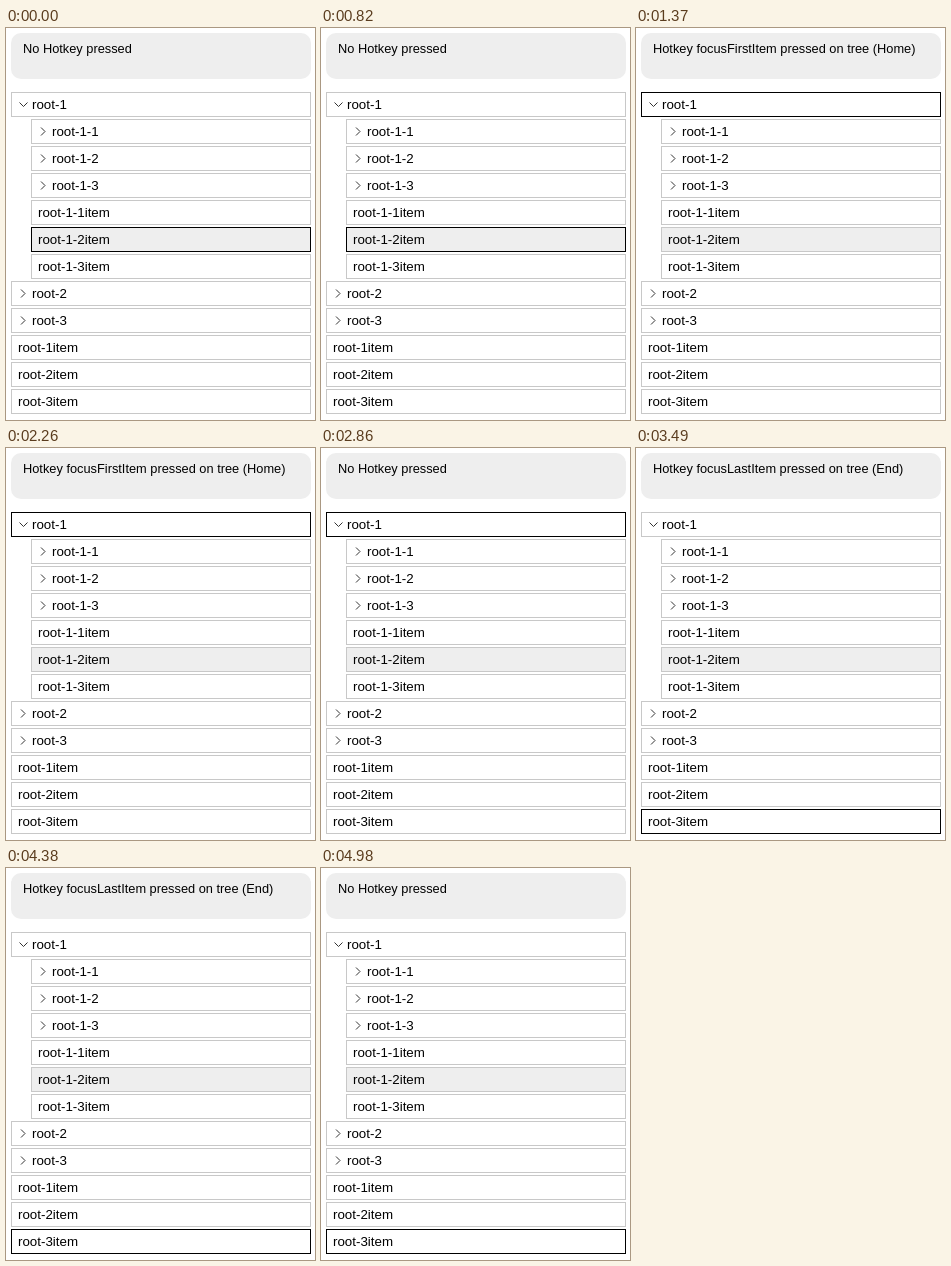
An HTML page for the animation above (5.92 s loop, 309 by 392 pixels).

```html
<!DOCTYPE html>
<html lang="en">
<head>
<meta charset="utf-8">
<title>Tree hotkeys</title>
<style>
  html, body { margin: 0; width: 100%; height: 100%; overflow: hidden; background: #fff; }
  svg { display: block; font: 13.333px Arial, "Liberation Sans", sans-serif; }
  #message { font-size: 12.8px; }
  .row rect { fill: #fff; stroke: #c8c8c8; }
  .row path { fill: none; stroke: #333; }
  .row.selected rect { fill: #eee; }
  .row.focused rect { stroke: #000; }
</style>
</head>
<body>
<svg width="309" height="392">
  <rect x="5" y="5" width="300" height="46" rx="10" fill="#eee"/>
  <text id="message" x="17" y="25"></text>
  <g id="tree"></g>
</svg>
<script>
const LOOP = 5920;
const IDLE = "No Hotkey pressed";
const SELECTED = "root-1-2item";
const rows = [
  "root-1", "root-1-1", "root-1-2", "root-1-3",
  "root-1-1item", SELECTED, "root-1-3item",
  "root-2", "root-3", "root-1item", "root-2item", "root-3item"
];
const steps = [
  { at: 0, message: IDLE, focus: SELECTED },
  { at: 1370, message: "Hotkey focusFirstItem pressed on tree (Home)", focus: "root-1" },
  { at: 2860, message: IDLE, focus: "root-1" },
  { at: 3490, message: "Hotkey focusLastItem pressed on tree (End)", focus: "root-3item" },
  { at: 4980, message: IDLE, focus: "root-3item" }
];

const message = document.getElementById("message");
const tree = document.getElementById("tree");

function rowMarkup(name, index) {
  const x = name.split("-").length > 2 ? 25 : 5;
  const y = 64 + index * 27;
  const folder = !name.endsWith("item");
  const chevron = name === "root-1" ? "M8.5 10.5l4 4 4-4" : "M10 8.5l4 4-4 4";
  return `<g class="row" transform="translate(${x} ${y})">
    <rect x=".5" y=".5" width="${299 - x + 5}" height="24"/>
    ${folder ? `<path d="${chevron}"/>` : ""}
    <text x="${folder ? 21 : 7}" y="17">${name}</text></g>`;
}

tree.innerHTML = rows.map(rowMarkup).join("");
const rowNodes = [...tree.children];
rowNodes[rows.indexOf(SELECTED)].classList.add("selected");

let shown;
function render(now) {
  const time = now % LOOP;
  const step = steps.findLast(s => s.at <= time);
  if (step !== shown) {
    shown = step;
    message.textContent = step.message;
    rowNodes.forEach((node, i) => node.classList.toggle("focused", rows[i] === step.focus));
  }
}

const start = performance.now();
function tick() {
  render(performance.now() - start);
  requestAnimationFrame(tick);
}
tick();
</script>
</body>
</html>
```
